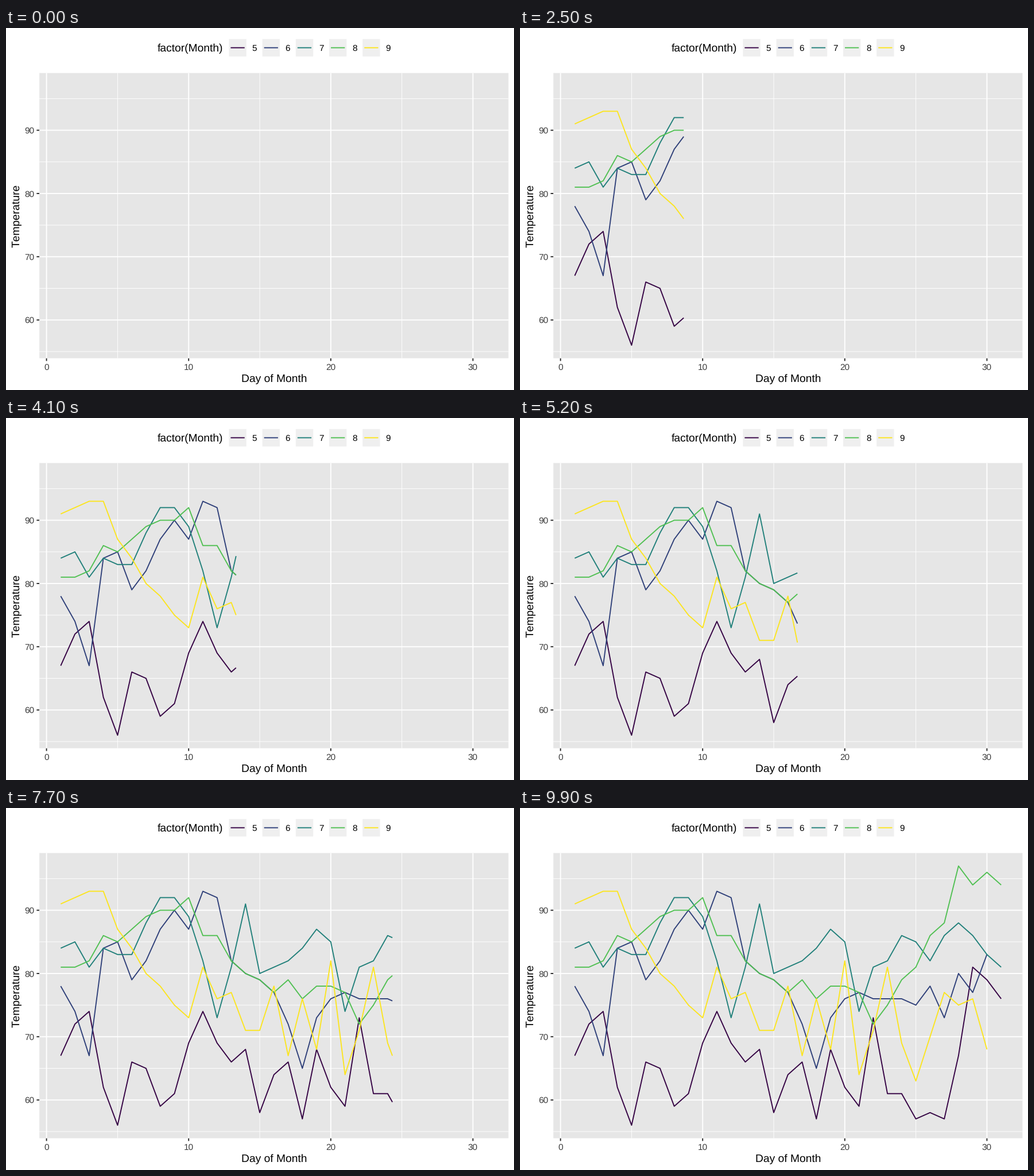
Recreate the animation shown at these times as a matplotlib script. Size 885 by 632 pixels, loop 10000 ms.

```python
import numpy as np
import matplotlib.pyplot as plt
from matplotlib.animation import FuncAnimation
from matplotlib.patches import Rectangle

plt.rcParams.update({
    "font.family": "Liberation Sans",
    "text.hinting": "none",
    "text.kerning_factor": 8,
})

W, H, DPI = 885, 632, 100
FRAMES, INTERVAL = 100, 100

# Panel edges and the data ranges they span
LEFT, RIGHT, TOP, BOTTOM = 58.2, 875.35, 78.6, 576.5
X_MIN, X_MAX = -0.5, 32.5
Y_MIN, Y_MAX = 53.95, 99.05

PT = 1.755            # pixels per point
TITLE, LABEL = 11 * PT, 8.8 * PT
GAP, TICK = 5.5 * PT, 2.75 * PT
KEY = 17.28 * PT
THICK, THIN = 1.88, 0.94
GREY, TICK_COLOR = "#3c3c3c", "#262626"
COLORS = ["#330042", "#2d3e78", "#1f7f79", "#4fc051", "#fce51e"]

# Daily temperatures, May to September
may = [67, 72, 74, 62, 56, 66, 65, 59, 61, 69, 74, 69, 66, 68, 58, 64,
       66, 57, 68, 62, 59, 73, 61, 61, 57, 58, 57, 67, 81, 79, 76]
june = [78, 74, 67, 84, 85, 79, 82, 87, 90, 87, 93, 92, 82, 80, 79, 77,
        72, 65, 73, 76, 77, 76, 76, 76, 75, 78, 73, 80, 77, 83]
july = [84, 85, 81, 84, 83, 83, 88, 92, 92, 89, 82, 73, 81, 91, 80, 81,
        82, 84, 87, 85, 74, 81, 82, 86, 85, 82, 86, 88, 86, 83, 81]
august = ([81, 81, 82, 86, 85, 87, 89, 90, 90, 92, 86, 86] + june[12:16]
          + [79, 76, 78, 78, 77, 72, 75, 79, 81, 86, 88, 97, 94, 96, 94])
september = [91, 92, 93, 93, 87, 84, 80, 78, 75, 73, 81, 76, 77, 71, 71, 78,
             67, 76, 68, 82, 64, 71, 81, 69, 63, 70, 77, 75, 76, 68]
months = [np.array(m) for m in (may, june, july, august, september)]

days = np.arange(1, 32)
# Each day is reached on a whole frame
day_frames = np.round((FRAMES - 1) * (days - 1) / 30)

fig = plt.figure(figsize=(W / DPI, H / DPI), dpi=DPI, facecolor="white")
ax = fig.add_axes([0, 0, 1, 1])
ax.set_xlim(0, W)
ax.set_ylim(H, 0)
ax.axis("off")


def px(day):
    return LEFT + (day - X_MIN) / (X_MAX - X_MIN) * (RIGHT - LEFT)


def py(temp):
    return BOTTOM - (temp - Y_MIN) / (Y_MAX - Y_MIN) * (BOTTOM - TOP)


def line(xs, ys, color, width, z=2):
    return ax.plot(xs, ys, color=color, lw=width * 72 / DPI, zorder=z,
                   solid_capstyle="butt", solid_joinstyle="round",
                   snap=False)[0]


def rect(x, y, w, h, color):
    ax.add_patch(Rectangle((x, y), w, h, fc=color, ec="none", lw=0,
                           zorder=1, snap=False))


def text(x, y, s, size, color="black", ha="left", rotation=0):
    ax.text(x, y, s, fontsize=size * 72 / DPI, color=color, ha=ha,
            va="baseline", rotation=rotation, rotation_mode="anchor")


def draw_panel():
    rect(LEFT, TOP, RIGHT - LEFT, BOTTOM - TOP, "#e6e6e6")
    for step, width, z in ((5, THIN, 2), (0, THICK, 3)):
        for d in range(step, 31, 10):
            line([px(d)] * 2, [TOP, BOTTOM], "white", width, z)
        for t in range(60 - step, 100, 10):
            line([LEFT, RIGHT], [py(t)] * 2, "white", width, z)


def draw_axes():
    for d in range(0, 31, 10):
        line([px(d)] * 2, [BOTTOM, BOTTOM + TICK], TICK_COLOR, THICK)
        text(px(d), 596.4, str(d), LABEL, GREY, "center")
    for t in range(60, 91, 10):
        line([LEFT - TICK, LEFT], [py(t)] * 2, TICK_COLOR, THICK)
        text(49.5, py(t) + 0.358 * LABEL, str(t), LABEL, GREY, "right")
    text((LEFT + RIGHT) / 2, 618.5, "Day of Month", TITLE, ha="center")
    text(23.5, (TOP + BOTTOM) / 2, "Temperature", TITLE, ha="center",
         rotation=90)


def draw_legend():
    top = 2 * GAP
    mid = top + KEY / 2
    text(263.9, mid + 0.358 * TITLE, "factor(Month)", TITLE)
    for i, color in enumerate(COLORS):
        x = 388.4 + 58.2 * i
        rect(x, top, KEY, KEY, "#efefef")
        line([x + 0.1 * KEY, x + 0.9 * KEY], [mid] * 2, color, THICK)
        text(x + KEY + GAP, mid + 0.358 * LABEL, str(5 + i), LABEL)


draw_panel()
draw_axes()
draw_legend()
curves = [line([], [], c, THICK, 4 + i) for i, c in enumerate(COLORS)]


def update(frame):
    now = np.interp(frame, day_frames, days)
    for curve, temps in zip(curves, months):
        own = days[:len(temps)]
        end = min(now, own[-1])
        xs = np.append(own[own < end], end)
        if len(xs) < 2:
            xs = np.array([])
        curve.set_data(px(xs), py(np.interp(xs, own, temps)))
    return curves


anim = FuncAnimation(fig, update, frames=FRAMES, interval=INTERVAL,
                     init_func=lambda: update(0), repeat=True,
                     repeat_delay=0, blit=False)
plt.show()
```
